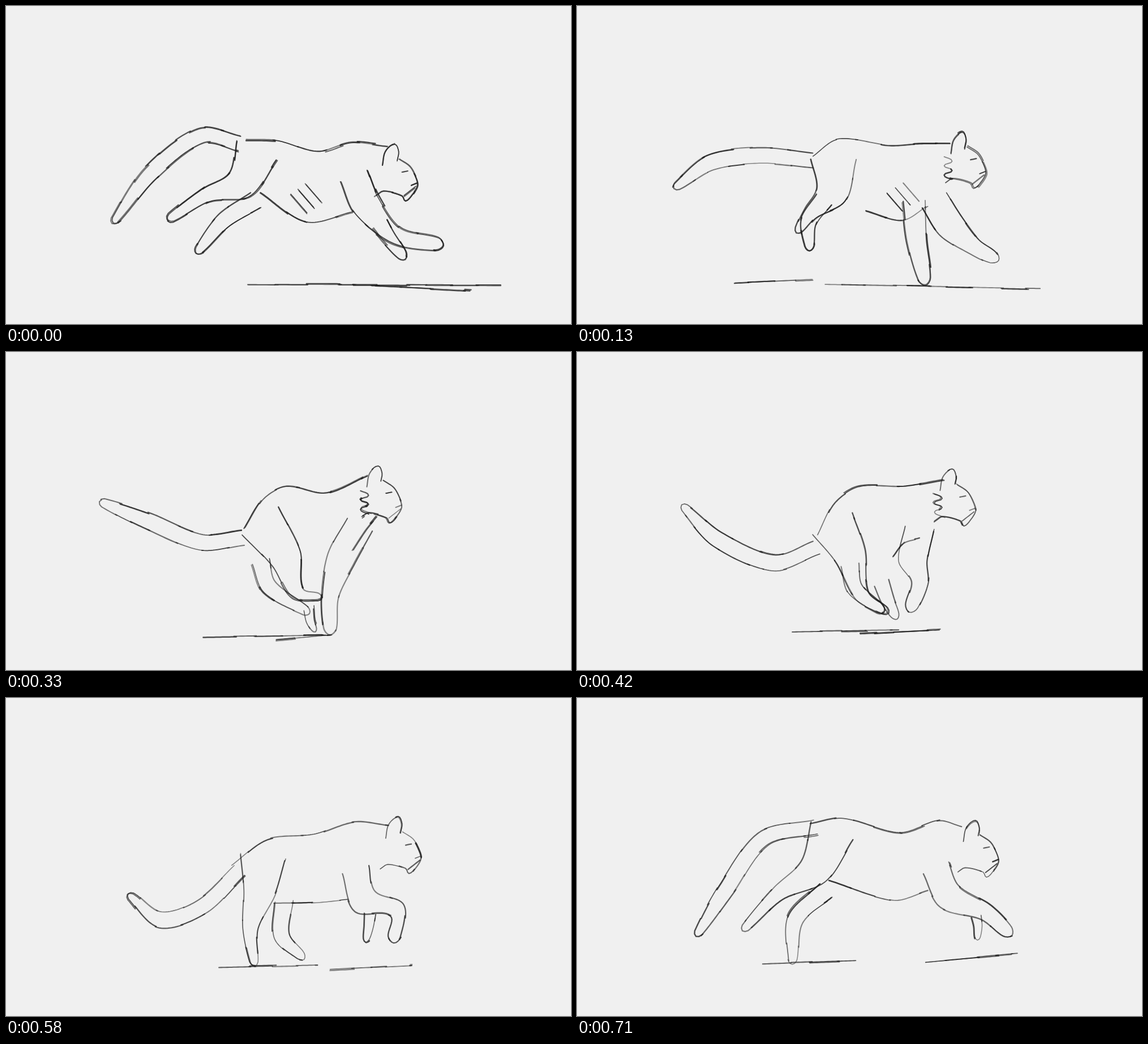
Recreate the animation shown at these times as an HTML page with a canvas. Size 998 by 561 pixels, loop 0.79 s.

```html
<!DOCTYPE html>
<html lang="en">
<head>
<meta charset="utf-8">
<title>Running cat sketch</title>
<style>
html, body { margin: 0; height: 100%; overflow: hidden; background: #f0f0f0; }
canvas { display: block; width: 100vw; height: 100vh; }
</style>
</head>
<body>
<canvas width="998" height="561"></canvas>
<script>
const ctx = document.querySelector('canvas').getContext('2d');
const LOOP = 790;
const starts = [0, 40, 80, 130, 170, 210, 250, 290, 330, 380, 420, 460, 500, 540, 580, 630, 670, 710];

// Half widths from the root of a limb to its end.
const widths = {
  tail: [13, 14, 14, 7],
  hindNear: [40, 28, 13, 7],
  hindFar: [16, 14, 8],
  foreNear: [25, 25, 15, 11],
  foreFar: [20, 17, 11]
};

// Head lines relative to the ear tip.
const headLines = [
  [-21, 37, -16, 13, 0, 0, 7, 13, 5, 26],
  [8, 26, 27, 39, 38, 59, 41, 73, 32, 89, 20, 100, 14, 91, -18, 83, -30, 90],
  [14, 49, 24, 47], [30, 73, 40, 69], [18, 92, 36, 78]
];

// Joints run from root to tip; ground holds two straight lines.
const poses = [
  { time: 0, weight: 1, ear: [686, 244],
    tail: [412, 243, 345, 229, 255, 295, 193, 378],
    back: [425, 236, 480, 238, 551, 257, 610, 241, 672, 247],
    belly: [450, 329, 530, 381, 610, 364],
    hindNear: [443, 255, 414, 315, 355, 333, 292, 374],
    hindFar: [440, 343, 385, 378, 341, 430],
    foreNear: [615, 300, 637, 352, 690, 405, 762, 420],
    foreFar: [660, 385, 675, 408, 700, 440],
    ground: [427, 491, 873, 493, 645, 493, 820, 502] },
  { time: 80, weight: .4, ear: [684, 233],
    tail: [410, 266, 310, 246, 225, 278, 178, 345],
    back: [413, 252, 465, 234, 583, 260, 625, 241, 660, 256],
    belly: [470, 348, 545, 388, 600, 383],
    hindNear: [448, 275, 425, 325, 365, 350, 302, 387],
    hindFar: [425, 345, 388, 378, 360, 422],
    foreNear: [632, 345, 680, 384, 728, 411, 772, 418],
    foreFar: [610, 345, 642, 420, 690, 484],
    ground: [203, 486, 288, 482, 444, 494, 829, 499] },
  { time: 210, weight: .35, ear: [676, 205],
    tail: [425, 282, 350, 292, 255, 272, 174, 274],
    back: [424, 285, 455, 237, 500, 224, 575, 246, 655, 222],
    belly: [574, 382, 625, 362, 650, 305],
    hindNear: [458, 270, 486, 345, 488, 388, 536, 406],
    hindFar: [455, 335, 442, 385, 490, 428],
    foreNear: [632, 340, 630, 395, 658, 445, 675, 485],
    foreFar: [570, 345, 533, 405, 492, 478],
    ground: [400, 493, 612, 483, 428, 485, 800, 499] },
  { time: 330, weight: .4, ear: [658, 201],
    tail: [418, 328, 345, 336, 250, 298, 172, 266],
    back: [422, 310, 455, 258, 495, 237, 565, 249, 638, 218],
    belly: [612, 350, 635, 315, 655, 290],
    hindNear: [450, 300, 495, 365, 515, 425, 552, 432],
    hindFar: [450, 370, 465, 415, 530, 457],
    foreNear: [625, 305, 592, 365, 572, 430, 572, 488],
    foreFar: [535, 455, 538, 475, 545, 490],
    ground: [348, 503, 565, 499, 478, 508, 575, 499] },
  { time: 500, weight: .35, ear: [667, 212],
    tail: [424, 362, 350, 404, 245, 358, 205, 282],
    back: [428, 335, 455, 273, 500, 239, 590, 226, 650, 233],
    belly: [510, 370, 525, 357, 560, 363],
    hindNear: [452, 305, 472, 355, 495, 435, 535, 478],
    hindFar: [512, 380, 515, 420, 540, 450],
    foreNear: [587, 320, 595, 372, 635, 385, 608, 415],
    foreFar: [542, 368, 560, 408, 578, 442],
    ground: [408, 485, 570, 482, 520, 487, 697, 482] },
  { time: 630, weight: .3, ear: [708, 209],
    tail: [405, 270, 345, 345, 290, 412, 232, 392],
    back: [380, 270, 465, 235, 570, 242, 630, 214, 690, 220],
    belly: [450, 358, 560, 363, 632, 350],
    hindNear: [455, 265, 432, 335, 392, 390, 378, 460],
    hindFar: [478, 350, 470, 420, 508, 458],
    foreNear: [637, 292, 658, 350, 725, 368, 735, 425],
    foreFar: [705, 388, 690, 400, 672, 415],
    ground: [355, 470, 537, 465, 605, 474, 729, 465] },
  { time: 710, weight: .3, ear: [704, 216],
    tail: [420, 228, 330, 248, 262, 340, 214, 415],
    back: [412, 222, 470, 212, 570, 237, 640, 216, 678, 226],
    belly: [445, 322, 560, 357, 620, 340],
    hindNear: [450, 235, 418, 305, 355, 345, 297, 405],
    hindFar: [440, 340, 386, 390, 381, 462],
    foreNear: [634, 300, 658, 350, 722, 378, 760, 412],
    foreFar: [705, 385, 708, 402, 707, 422],
    ground: [328, 469, 490, 463, 616, 466, 778, 451] }
];

const mix = (a, b, k) => a + (b - a) * k;
const distance = (a, b) => Math.hypot(b[0] - a[0], b[1] - a[1]);
const pairs = flat => flat.flatMap((x, i) => i % 2 ? [] : [[x, flat[i + 1]]]);

function seeded(seed) {
  return () => {
    seed = (seed * 1664525 + 1013904223) >>> 0;
    return seed / 4294967296;
  };
}

function heading(points, i) {
  const a = points[Math.max(i - 1, 0)], b = points[Math.min(i + 1, points.length - 1)];
  const d = distance(a, b) || 1;
  return [(b[0] - a[0]) / d, (b[1] - a[1]) / d];
}

// Cubic curve through all points, sampled about every 4 pixels.
function smooth(points) {
  const out = [points[0]];
  for (let i = 1; i < points.length; i++) {
    const a = points[i - 1], b = points[i], u = heading(points, i - 1), v = heading(points, i);
    const d = distance(a, b), reach = d * .3, steps = Math.max(2, Math.round(d / 4));
    for (let s = 1; s <= steps; s++) {
      const t = s / steps, r = 1 - t;
      out.push([0, 1].map(c => r * r * r * a[c] + 3 * r * r * t * (a[c] + u[c] * reach)
        + 3 * r * t * t * (b[c] - v[c] * reach) + t * t * t * b[c]));
    }
  }
  return out;
}

// Outline around a chain of joints, open at the root.
function limb(joints, halfWidths) {
  let length = 0;
  for (let i = 1; i < joints.length; i++) length += distance(joints[i - 1], joints[i]);
  const scale = Math.min(1, length / 90);
  const side = sign => joints.map((p, i) => {
    const [dx, dy] = heading(joints, i), w = halfWidths[i] * scale * sign;
    return [p[0] - dy * w, p[1] + dx * w];
  });
  const last = joints.length - 1, [dx, dy] = heading(joints, last);
  const cap = halfWidths[last] * scale;
  const tip = [joints[last][0] + dx * cap, joints[last][1] + dy * cap];
  return [...side(1), tip, ...side(-1).reverse()];
}

// Retraces a line with short, overlapping pencil dashes.
function pencil(points, random, again) {
  const last = points.length - 1;
  for (let i = 0; i < last;) {
    const goal = mix(22, 58, random());
    let end = i, run = 0;
    while (end < last && run < goal) run += distance(points[end], points[++end]);
    const passes = random() < again ? 2 : 1;
    for (let p = 0; p < passes; p++) {
      const shake = p ? 4 : 1.4;
      const dx = (random() - .5) * shake, dy = (random() - .5) * shake;
      const out = heading(points, end), over = run > 20 ? random() * 5 : 0;
      ctx.beginPath();
      for (let j = i; j <= end; j++) ctx.lineTo(points[j][0] + dx, points[j][1] + dy);
      ctx.lineTo(points[end][0] + dx + out[0] * over, points[end][1] + dy + out[1] * over);
      ctx.lineWidth = mix(1.5, 2.5, random());
      ctx.strokeStyle = `rgba(30,30,30,${mix(.5, .85, random())})`;
      ctx.stroke();
    }
    i = end;
  }
}

function poseAt(time) {
  const i = poses.findLastIndex(p => p.time <= time);
  const a = poses[i], b = poses[i + 1] || a;
  const k = a === b ? 0 : (time - a.time) / (b.time - a.time);
  const blend = (x, y) => Array.isArray(x) ? x.map((v, j) => mix(v, y[j], k)) : mix(x, y, k);
  return Object.fromEntries(Object.keys(a).map(key => [key, blend(a[key], b[key])]));
}

function draw(index) {
  const time = starts[index], random = seeded(index * 7919 + 17), pose = poseAt(time);
  const sketch = points => pencil(smooth(points), random, pose.weight);
  ctx.fillStyle = '#f0f0f0';
  ctx.fillRect(0, 0, 998, 561);
  ctx.lineCap = ctx.lineJoin = 'round';

  for (const name in widths) sketch(limb(pairs(pose[name]), widths[name]));
  sketch(pairs(pose.back));
  sketch(pairs(pose.belly));

  const [ex, ey] = pose.ear;
  for (const line of headLines) sketch(pairs(line).map(([x, y]) => [ex + x, ey + y]));
  if (time >= 80 && time <= 500)
    sketch(Array.from({ length: 6 }, (_, i) => [ex - 32 + i % 2 * 14, ey + 44 + i * 8]));

  // Ribs show while the body is stretched.
  if (time <= 130) for (let i = 0; i < 3; i++) {
    const x = pose.belly[2] - 28 + i * 14, y = pose.belly[3] - 48 - i * 9;
    sketch([[x, y], [x + 26, y + 30]]);
  }

  const ground = pairs(pose.ground);
  for (let i = 0; i < ground.length; i += 2) sketch([ground[i], ground[i + 1]]);
}

let shown = -1;
function tick() {
  const time = performance.now() % LOOP;
  const index = starts.findLastIndex(s => s <= time);
  if (index !== shown) draw(shown = index);
  requestAnimationFrame(tick);
}
tick();
</script>
</body>
</html>
```
